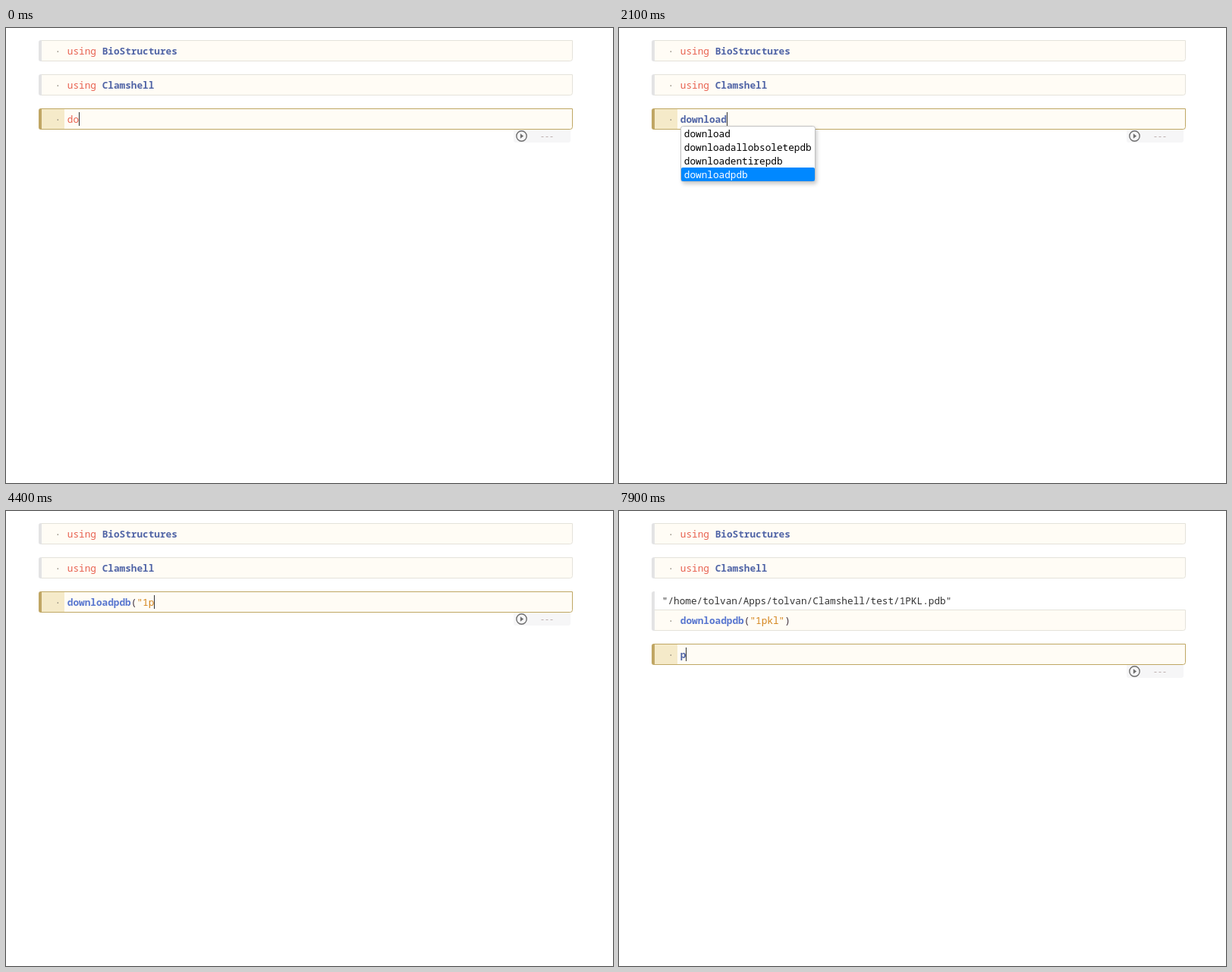
These frames come from a looping animation (800x600 px, 8 s). An HTML page:

```html
<!DOCTYPE html>
<html lang="en">
<head>
<meta charset="utf-8">
<title>Notebook cell</title>
<style>
  html, body { margin: 0; width: 100%; height: 100%; overflow: hidden; background: #fff; }
  svg { display: block; }
  text { font: 12.73px "Roboto Mono", "Noto Sans Mono", monospace; white-space: pre; fill: #41323f; }
  .key { fill: #e8604f; }
  .var { fill: #5064a6; font-weight: 600; }
  .call { fill: #5876cf; font-weight: 600; }
  .str { fill: #d4841a; }
  .match { fill: #000; font-weight: 700; }
  .out { fill: #333; }
  .hint { fill: #000; }
  .picked { fill: #fff; }
  .ghost { fill: #c4c4bf; font-style: italic; }
  .dot { fill: #8a8578; }
  .time { font-size: 10px; fill: #b5a5a5; }
  .popup { filter: drop-shadow(2px 3px 2.5px rgba(0, 0, 0, .2)); }
</style>
</head>
<body>
<svg id="stage" width="800" height="600" viewBox="0 0 800 600"></svg>
<script>
const LOOP = 8000, STEP = 100;
const CHAR = 7.638, CODE_X = 80.8;
const NAME = 'downloadpdb';
const HINTS = ['download', 'downloadallobsoletepdb', 'downloadentirepdb', NAME];

// [start ms, typed code]
const TYPING = [
  [0, 'do'], [100, 'dow'], [400, 'down'], [500, 'downl'], [700, 'downlo'],
  [800, 'download'], [2400, NAME], [2900, NAME + '('], [3100, NAME + '("'],
  [3600, NAME + '("1'], [4000, NAME + '("1k'], [4300, NAME + '("1'],
  [4400, NAME + '("1p'], [4600, NAME + '("1pk'], [4700, NAME + '("1pkl'],
  [5000, NAME + '("1pkl"'], [5300, NAME + '("1pkl")']
];
// [start ms, highlighted hint], -1 closes the list
const PICKS = [[0, -1], [1000, 0], [1900, 1], [2000, 2], [2100, 3], [2400, -1]];
const CARET = [[0, 1], [1500, 0], [1900, 1], [5800, 0], [5900, 1],
  [6400, 0], [7000, 1], [7500, 0], [7800, 1]];
// [ms, icon opacity], linear between the points
const ICON = [[0, .55], [3000, .55], [3300, 1], [3500, 1], [3900, .55],
  [5800, .55], [5900, .3], [7700, .3], [7900, .55], [8000, .55]];

const stage = document.getElementById('stage');

const at = (table, t) => table.filter(row => row[0] <= t).pop()[1];

function mix(table, t) {
  const i = table.findIndex(row => row[0] > t);
  const [t0, a] = table[i - 1], [t1, b] = table[i];
  return a + (b - a) * (t - t0) / (t1 - t0);
}

const rect = (x, y, w, h, fill, extra = '') =>
  `<rect x="${x}" y="${y}" width="${w}" height="${h}" fill="${fill}" ${extra}/>`;

const text = (x, y, str, cls) => `<text x="${x}" y="${y}" class="${cls}">${str}</text>`;

// parts: [string, class] pairs set one after the other
function line(y, parts) {
  let x = CODE_X;
  return parts.map(([str, cls]) => {
    const piece = text(x, y, str, cls);
    x += str.length * CHAR;
    return piece;
  }).join('');
}

const bar = (y, h, fill) =>
  `<path d="M47 ${y}h-1q-3 0-3 3v${h - 6}q0 3 3 3h1z" fill="${fill}"/>`;

function box(y, edited, dotX = 64.4) {
  const edge = edited ? '#bfa763' : '#e4e2da';
  return `<path d="M46.5 ${y + .5}H746.5v24q0 3-3 3H46.5z" fill="#fffcf5" stroke="${edge}"/>` +
    (edited ? rect(47, y + 1, 30, 26, '#f5eac9') : '') +
    text(dotX, y + 19, '·', 'dot');
}

const cell = (y, edited, dotX) =>
  box(y, edited, dotX) + bar(y, 28, edited ? '#c0a664' : '#e3e3e4');

function runArea(y, opacity) {
  return `<path d="M669 ${y}h75v14q0 3-3 3h-69q-3 0-3-3z" fill="#f6f6f7"/>` +
    `<g opacity="${opacity}" transform="translate(679.5 ${y + 8.5})">` +
    `<circle r="6.7" fill="none" stroke="#000" stroke-width="1.4"/>` +
    `<path d="M-1.6-3.3L2.6 0-1.6 3.3z"/></g>` +
    `<text x="704" y="${y + 11.5}" class="time"${opacity < .4 ? ' style="fill:#aaa"' : ''}>---</text>`;
}

const caret = (y, count) => rect(Math.floor(CODE_X + .2 + count * CHAR), y + 5, 1, 18, '#333');

function codeParts(code) {
  if (code === 'do') return [[code, 'key']];
  if (!code.includes('(')) return [[code, 'var']];
  const closed = code.endsWith(')');
  const str = code.slice(NAME.length + 1, closed ? -1 : undefined);
  return [[NAME, 'call'], ['(', ''], [str, 'str'], [closed ? ')' : '', '']];
}

function matched(y, parts) {
  const shade = n => rect(CODE_X + n * CHAR, y + 5, CHAR, 18, '#dde0df');
  parts[1][1] = parts[3][1] = 'match';
  return shade(11) + shade(18) + line(y + 19, parts);
}

function popup(pick) {
  return `<rect class="popup" x="81.5" y="129.5" width="177" height="73" rx="3" fill="#fff" stroke="#c0c0c0"/>` +
    HINTS.map((hint, i) =>
      (i === pick ? rect(82, 130 + 18 * i, 176, 18, '#08f', 'rx="2"') : '') +
      text(85.8, 144 + 18 * i, hint, i === pick ? 'picked' : 'hint')).join('');
}

function importCell(y, name) {
  return cell(y, false) + line(y + 19, [['using ', 'key'], [name, 'var']]);
}

function editing(t, code) {
  const parts = codeParts(code), pick = at(PICKS, t);
  return runArea(134, mix(ICON, t)) + cell(106, true) +
    (code.endsWith(')') ? matched(106, parts) : line(125, parts)) +
    (at(CARET, t) ? caret(106, code.length) : '') +
    (pick < 0 ? '' : popup(pick));
}

function submitted(t, code) {
  const done = t >= 6200, typed = t >= 7800;
  const codeY = done ? 130 : 106, nextY = codeY + 45;
  return (done ? text(56.8, 123, '"/home/tolvan/Apps/tolvan/Clamshell/test/1PKL.pdb"', 'out') : '') +
    box(codeY, t < 6000) + bar(106, codeY - 78, t < 6000 ? '#c0a664' : '#e3e3e4') +
    line(codeY + 19, codeParts(code)) +
    runArea(nextY + 28, mix(ICON, t)) + cell(nextY, typed, typed ? 64.4 : 65.4) +
    line(nextY + 19, [typed ? ['p', 'var'] : ['Enter cell code...', 'ghost']]) +
    (at(CARET, t) ? caret(nextY, typed ? 1 : 0) : '');
}

function draw(t) {
  const code = at(TYPING, t);
  stage.innerHTML = importCell(16, 'BioStructures') + importCell(61, 'Clamshell') +
    (t < 5900 ? editing(t, code) : submitted(t, code));
}

const start = performance.now();
let shown = -1;

function tick() {
  const t = Math.floor((performance.now() - start) % LOOP / STEP) * STEP;
  if (t !== shown) draw(shown = t);
  requestAnimationFrame(tick);
}
tick();
</script>
</body>
</html>
```
